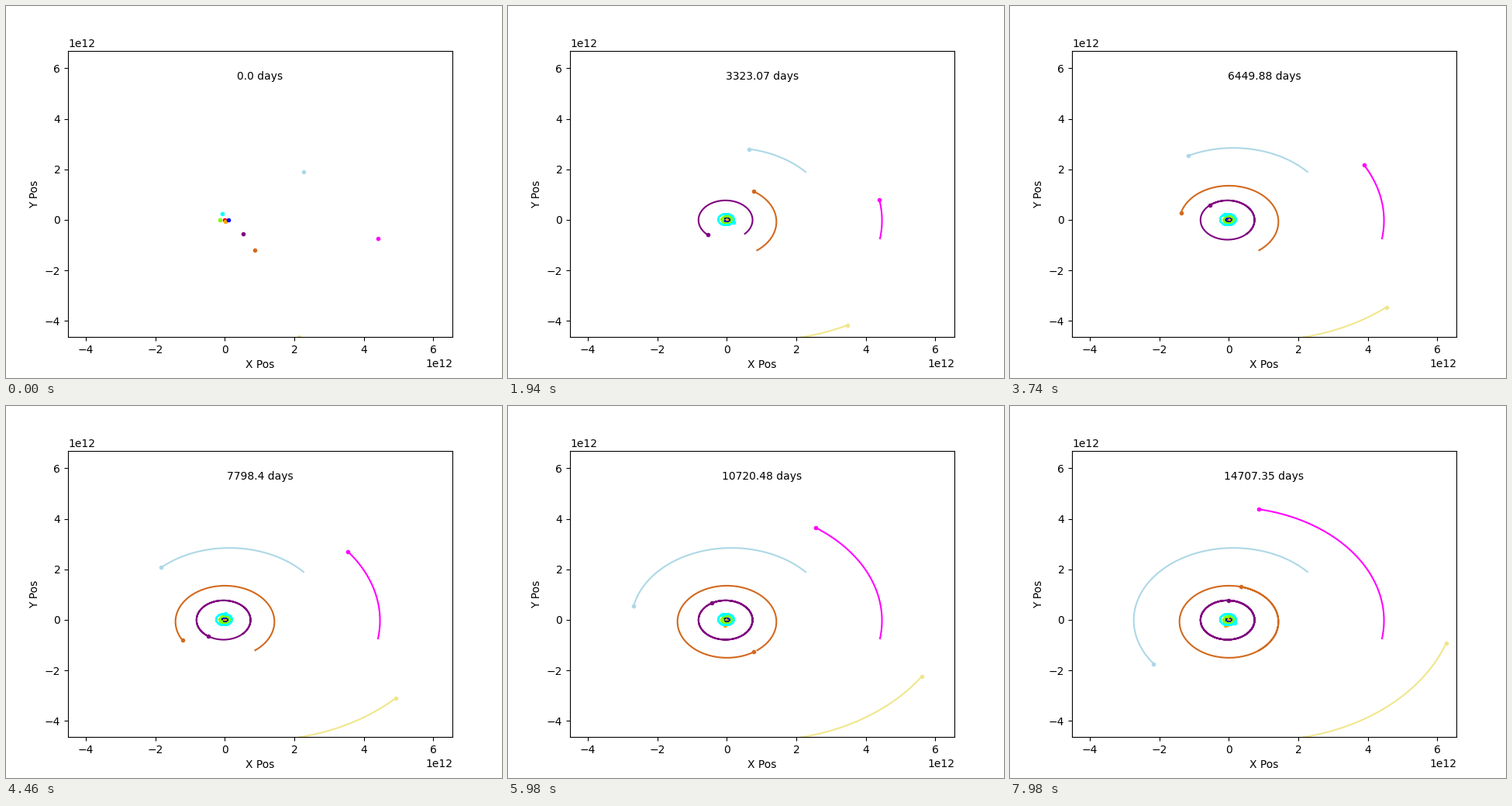
Write a matplotlib script that moves like this. It is 640 px wide and 480 px high and loops after 8000 ms.

```python
import numpy as np
import matplotlib.pyplot as plt
from matplotlib.animation import FuncAnimation

FRAMES = 400
STEP = 20  # ms

# Elapsed days; the simulation step changes a few times along the way
KEY_FRAMES = [0, 97, 187, 196.6, 258, 299, 359, 399]
KEY_DAYS = [0, 3323.07, 6449.88, 6783.4, 9144.05, 10720.48, 13027.38, 14707.35]
days = np.interp(np.arange(FRAMES), KEY_FRAMES, KEY_DAYS)
progress = days / days[-1]

# dot, trail, semi-major axis (1e12 m), eccentricity, perihelion longitude,
# start longitude, swept angle (degrees), growth of the aphelion (1e12 m)
PLANETS = [
    ("orange", "orange", 0.0579, 0.2056, 77, 282, 11830, 0.18),
    ("blue", "navy", 0.1082, 0.0068, 131, 359, 23285, 0),
    ("chartreuse", "chartreuse", 0.1496, 0.0167, 103, 178, 14320, 0),
    ("cyan", "cyan", 0.2279, 0.0934, 336, 106, 7416, 0),
    ("purple", "purple", 0.7785, 0.0489, 14.7, 313.5, 1216.5, 0),
    ("chocolate", "chocolate", 1.4270, 0.0540, 93, 305.9, 489.2, 0),
    ("lightblue", "lightblue", 2.8710, 0.0470, 171, 39.9, 179.0, 0),
    ("magenta", "magenta", 4.4980, 0.0090, 45, -9.5, 88.35, 0),
    ("khaki", "khaki", 5.9060, 0.2488, 224.1, 294.9, 57.7, 0),
]
NODE, SQUASH = np.radians(110.3), np.cos(np.radians(17.14))  # outermost orbit


def mean_anomaly(nu, e):
    b = e / (1 + np.sqrt(1 - e * e))
    ecc = nu - 2 * np.arctan2(b * np.sin(nu), 1 + b * np.cos(nu))
    return ecc - e * np.sin(ecc)


def orbit(a, e, peri, start, sweep, growth, tilted=False):
    peri, start, sweep = np.radians([peri, start, sweep])
    m0 = mean_anomaly(start - peri, e)
    m1 = mean_anomaly(start + sweep - peri, e)
    m = m0 + (m1 - m0) * progress

    near = a * (1 - e)
    a = a + growth / 2 * np.sqrt(progress)
    e = 1 - near / a
    ecc = m + e * np.sin(m)
    for _ in range(8):
        ecc = ecc - (ecc - e * np.sin(ecc) - m) / (1 - e * np.cos(ecc))

    u = a * (np.cos(ecc) - e)
    v = a * np.sqrt(1 - e * e) * np.sin(ecc)
    turn = peri - NODE if tilted else peri
    x = u * np.cos(turn) - v * np.sin(turn)
    y = u * np.sin(turn) + v * np.cos(turn)
    if tilted:
        y = y * SQUASH
        x, y = (x * np.cos(NODE) - y * np.sin(NODE),
                x * np.sin(NODE) + y * np.cos(NODE))
    return x * 1e12, y * 1e12


fig, ax = plt.subplots(figsize=(6.4, 4.8), dpi=100)
fig.subplots_adjust(left=0.125, right=0.9, bottom=0.11, top=0.88)
ax.set_xlim(-4.516e12, 6.555e12)
ax.set_ylim(-4.645e12, 6.700e12)
ax.set_xlabel("X Pos")
ax.set_ylabel("Y Pos")
label = ax.text(0.5, 0.9, "", transform=ax.transAxes, ha="center")

ax.plot(0, 0, ".", color="red")
bodies = []
for dot_color, trail_color, *elements in PLANETS:
    x, y = orbit(*elements, tilted=dot_color == "khaki")
    trail, = ax.plot([], [], color=trail_color)
    dot, = ax.plot([], [], ".", color=dot_color)
    bodies.append((x, y, trail, dot))


def draw(i):
    for x, y, trail, dot in bodies:
        trail.set_data(x[:i + 1], y[:i + 1])
        dot.set_data(x[i:i + 1], y[i:i + 1])
    label.set_text(f"{round(float(days[i]), 2)} days")
    return []


anim = FuncAnimation(fig, draw, frames=FRAMES, interval=STEP, repeat=True,
                     repeat_delay=0, init_func=lambda: draw(0))
plt.show()
```
